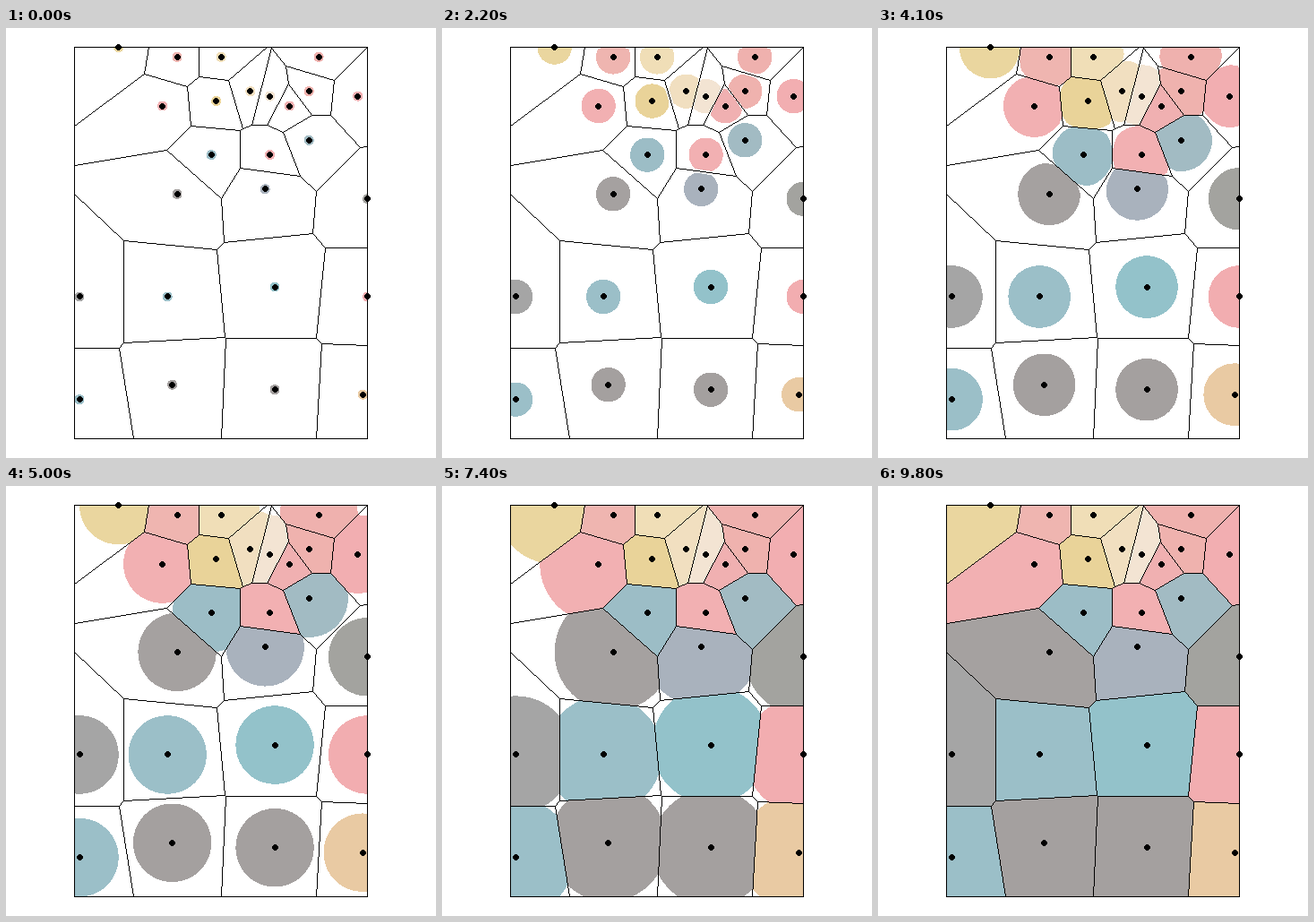
Recreate the animation shown at these times as a matplotlib script. Size 480 by 480 pixels, loop 10000 ms.

```python
import numpy as np
import matplotlib.pyplot as plt
from matplotlib.animation import FuncAnimation
from matplotlib.patches import Polygon

SIZE, DPI = 480, 100
WIDTH, HEIGHT = 60, 80
ORIGIN = np.array([76.6, 458.3])
SCALE = np.array([5.45, -5.46])
DOT_RADIUS = 3

# x, y, fill
SEEDS = [
    (9, 80, "#ead69f"), (21, 78, "#efb5b0"), (30, 78, "#f0deb7"),
    (50, 78, "#efb1ae"), (36, 71, "#f1dfc0"), (40, 70, "#f3e4d3"),
    (44, 68, "#f0b0b1"), (48, 71, "#efb2ae"), (58, 70, "#f2aeb1"),
    (29, 69, "#e9d399"), (18, 68, "#f2b0b2"), (48, 61, "#a2bbc3"),
    (28, 58, "#9cbdc6"), (40, 58, "#f2b0b2"), (39, 51, "#a9b2bd"),
    (21, 50, "#a5a1a0"), (60, 49, "#a3a39f"), (1, 29, "#a5a5a5"),
    (19, 29, "#9bbfc8"), (41, 31, "#93c2ca"), (60, 29, "#f2adb0"),
    (20, 11, "#a4a09f"), (41, 10, "#a4a09f"), (59, 9, "#e9caa3"),
    (1, 8, "#9bbfc8"),
]
points = np.array([seed[:2] for seed in SEEDS], float)

# Radius limits, each reached and then held for one extra frame
RADII = [1, 2, 4, 6, 8, 10, 12, 14, 100]
ARRIVALS = [12, 25, 38, 50, 62, 74, 86, 98]
KEY_FRAMES = [0] + [f for a in ARRIVALS for f in (a, a + 1)]
KEY_STATES = [0] + [s for s in range(1, len(RADII)) for _ in range(2)]

theta = np.linspace(0, 2 * np.pi, 1440, endpoint=False)
rays = np.column_stack([np.cos(theta), np.sin(theta)])


def to_pixels(xy):
    return ORIGIN + np.asarray(xy) * SCALE


def half_planes(i, skip=()):
    """Normals n and offsets c with n . p <= c for the cell of point i."""
    others = [j for j in range(len(points)) if j != i and j not in skip]
    normals = points[others] - points[i]
    offsets = np.sum(normals * (points[others] + points[i]) / 2, axis=1)
    box = np.array([[1, 0], [-1, 0], [0, 1], [0, -1]], float)
    return (np.vstack([normals, box]),
            np.append(offsets, [WIDTH, 0, HEIGHT, 0]))


def cell_reach(i):
    """Distance from point i to its cell border along every ray."""
    normals, offsets = half_planes(i)
    slack = offsets - normals @ points[i]
    speed = rays @ normals.T
    ahead = speed > 1e-9
    return np.where(ahead, slack / np.where(ahead, speed, 1), np.inf).min(axis=1)


def shared_edge(i, j):
    """Part of the bisector of i and j that borders both cells, or None."""
    middle = (points[i] + points[j]) / 2
    dx, dy = points[j] - points[i]
    along = np.array([-dy, dx])
    normals, offsets = half_planes(i, skip=(j,))
    slack, speed = offsets - normals @ middle, normals @ along
    flat = np.abs(speed) < 1e-9
    if np.any(slack[flat] < 0):
        return None
    limits = slack[~flat] / speed[~flat]
    low = limits[speed[~flat] < 0].max()
    high = limits[speed[~flat] > 0].min()
    if high - low < 1e-6:
        return None
    return middle + low * along, middle + high * along


def draw_line(ink, start, end):
    """One-pixel line without smoothing."""
    a, b = (np.floor(to_pixels(p)).astype(int) for p in (start, end))
    steps = np.abs(b - a).max()
    x, y = np.rint(np.linspace(a, b, steps + 1)).astype(int).T
    ink[y, x, 3] = 1


def draw_dot(ink, center):
    cx, cy = np.floor(to_pixels(center))
    y, x = np.mgrid[:SIZE, :SIZE]
    ink[(x - cx) ** 2 + (y - cy) ** 2 <= DOT_RADIUS ** 2 + 1, 3] = 1


reaches = [cell_reach(i) for i in range(len(points))]
corners = [(0, 0), (WIDTH, 0), (WIDTH, HEIGHT), (0, HEIGHT)]
edges = list(zip(corners, corners[1:] + corners[:1]))
edges += [edge for i in range(len(points)) for j in range(i)
          if (edge := shared_edge(i, j))]

ink = np.zeros((SIZE, SIZE, 4))
for edge in edges:
    draw_line(ink, *edge)
for point in points:
    draw_dot(ink, point)

fig = plt.figure(figsize=(SIZE / DPI, SIZE / DPI), dpi=DPI, facecolor="white")
ax = fig.add_axes([0, 0, 1, 1])
ax.axis("off")
tiles = [ax.add_patch(Polygon([[0, 0]], facecolor=color, edgecolor="none",
                              antialiased=False, zorder=1))
         for _, _, color in SEEDS]
ax.imshow(ink, extent=(0, SIZE, SIZE, 0), interpolation="nearest",
          aspect="auto", zorder=2)
ax.set_xlim(0, SIZE)
ax.set_ylim(SIZE, 0)

# Unsmoothed fills spread half a pixel outwards
SPREAD = 0.5 / SCALE[0]


def update(frame):
    state = np.interp(frame, KEY_FRAMES, KEY_STATES)
    k = min(int(state), len(RADII) - 2)
    mix = state - k
    for point, reach, tile in zip(points, reaches, tiles):
        start, end = np.minimum(reach, RADII[k]), np.minimum(reach, RADII[k + 1])
        extent = np.maximum(start + mix * (end - start) - SPREAD, 0)
        tile.set_xy(to_pixels(point + extent[:, None] * rays))
    return tiles


anim = FuncAnimation(fig, update, frames=100, interval=100, repeat=True,
                     repeat_delay=0, blit=False)
plt.show()
```
